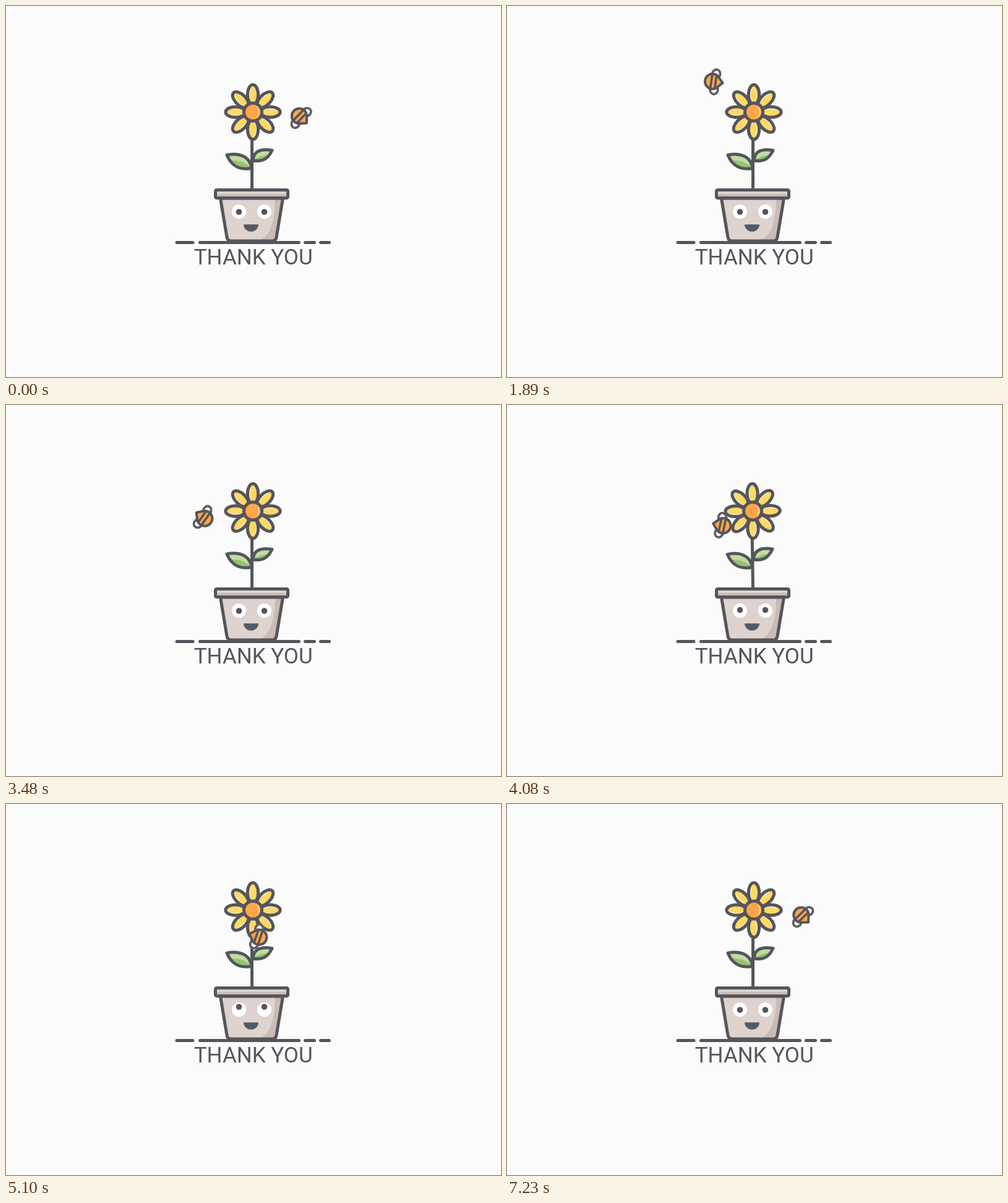
Write an HTML page that moves like this. It is 800 px wide and 600 px high and loops after 7.26 s.

```html
<!DOCTYPE html>
<html lang="en">
<head>
<meta charset="utf-8">
<title>Thank you</title>
<style>
html, body { margin: 0; height: 100%; overflow: hidden; background: #fbfbfb; }
svg { display: block; width: 800px; height: 600px; }
.line { fill: none; stroke: #55555d; stroke-width: 5; stroke-linecap: round; stroke-linejoin: round; }
text { font: 400 35px Roboto, sans-serif; fill: #55555d; text-anchor: middle; }
</style>
</head>
<body>
<svg viewBox="0 0 800 600">
  <defs>
    <g id="petal">
      <ellipse cy="-28" rx="8.6" ry="16.2" fill="#fff6dc"/>
      <ellipse cx="2" cy="-27" rx="6.8" ry="15.5" fill="#ffd966"/>
      <ellipse class="line" cy="-28" rx="8.6" ry="16.2"/>
    </g>
    <ellipse id="wing" rx="6.4" ry="7.6" fill="#fbfbfb" fill-opacity=".9" stroke="#5f5f67" stroke-width="3.8"/>
    <path id="left" d="M357 241C375 237 394 242 397 262.500C376 266 364 258 357 241Z"/>
    <path id="right" d="M430 233.500C412 230 399 235 399.500 250C416 252.500 424 246 430 233.500Z"/>
    <path id="pot" d="M346.500 311L357 374Q358 380 364 380H430Q436 380 437 374L447.500 311Z"/>
    <rect id="rim" x="338.500" y="297.500" width="117" height="13" rx="2"/>
  </defs>

  <g id="flower">
    <path class="line" d="M397.500 212V296"/>
    <g fill="#c0dca2"><use href="#left"/><use href="#right"/></g>
    <path d="M362 250Q382 248 397 262Q377 266 362 250ZM425 241Q411 241 399.500 250Q417 252 425 241Z" fill="#94c373"/>
    <g class="line"><use href="#left"/><use href="#right"/></g>
    <g transform="translate(399 171.500)">
      <g id="petals"></g>
      <circle r="14.500" fill="#ffc57c"/>
      <path d="M3-14A14.500 14.500 0 1 0 3 14Q14 0 3-14Z" fill="#ffa647"/>
      <circle class="line" r="14.500"/>
    </g>
  </g>

  <use href="#pot" fill="#ded3ce"/>
  <path d="M435 311C435 346 428 373 408 380H430Q436 380 437 374L447.500 311Z" fill="#cabcb4"/>
  <use href="#pot" class="line"/>
  <use href="#rim" fill="#ded3ce"/>
  <path d="M339 304H455V310H339Z" fill="#cabcb4"/>
  <use href="#rim" class="line"/>
  <g id="eyes"></g>
  <path d="M384 353.300H408A12 11.500 0 0 1 384 353.300Z" fill="#555a62"/>
  <path class="line" d="M276 382.400H302M313.500 382.400H473.500M483.500 382.400H498.500M508.500 382.400H522.500"/>
  <text x="399.700" y="418">THANK YOU</text>

  <g id="bee">
    <use href="#wing" transform="translate(-4 -12.500) rotate(-14)"/>
    <use href="#wing" transform="translate(-4 12.500) rotate(14)"/>
    <path d="M-16.500 0L-7.500-9.600A12.200 12.200 0 1 1-7.500 9.600Z" fill="#ffa647" stroke="#55555d" stroke-width="4" stroke-linejoin="round"/>
    <path d="M2-11V11M-5-10V10" stroke="#55555d" stroke-width="3.600"/>
  </g>
</svg>
<script>
const LOOP = 7260;
const $ = s => document.querySelector(s);
const move = (s, value) => $(s).setAttribute('transform', value);

$('#petals').innerHTML = [45, 135, 225, 315, 0, 90, 180, 270]
  .map(a => `<use href="#petal" transform="rotate(${a})"/>`).join('');
$('#eyes').innerHTML = [-20.5, 20.5].map(x =>
  `<circle cx="${x}" r="11.5" fill="#fff"/><circle class="pupil" cx="${x}" r="4.8" fill="#55555d"/>`).join('');

// The bee passes these points at equal intervals.
const route = [
  [474, 178], [424, 149], [366, 130], [315, 123], [301, 160],
  [328, 188], [364, 199], [408, 215], [456, 229], [495, 218]
];

// Closed Catmull-Rom curve; the bee faces along its tangent.
function beeAt(t) {
  const n = route.length, s = t / LOOP * n, i = Math.floor(s), u = s - i;
  const [p, q, r, w] = [n - 1, 0, 1, 2].map(d => route[(i + d) % n]);
  const [[x, dx], [y, dy]] = [0, 1].map(k => {
    const b = (r[k] - p[k]) / 2, e = (w[k] - q[k]) / 2, d = r[k] - q[k];
    const c2 = 3 * d - 2 * b - e, c3 = b + e - 2 * d;
    return [q[k] + u * (b + u * (c2 + u * c3)), b + u * (2 * c2 + 3 * u * c3)];
  });
  return `translate(${x} ${y}) rotate(${Math.atan2(dy, dx) * 180 / Math.PI})`;
}

const part = (t, from, to) => Math.min(1, Math.max(0, (t - from) / (to - from)));
const ease = (t, from, to) => { const u = part(t, from, to); return u * u * (3 - 2 * u); };
const glance = (t, from, to) => ease(t, from, from + 500) - ease(t, to, to + 350);
const blink = (t, at) => Math.sin(Math.PI * part(t, at, at + 180));

function draw() {
  const t = Math.floor(performance.now() % LOOP / 30) * 30;
  move('#bee', beeAt(t));

  const p = part(t, 3700, 4500);
  move('#flower', `rotate(${4.3 * (1 - p) ** 2 * Math.sin(p * Math.PI * 8 / 3)} 397.5 296)`);

  move('#eyes', `translate(397 332.5) scale(1 ${1 - 0.92 * (blink(t, 600) + blink(t, 6350))})`);
  const up = glance(t, 850, 1500) + glance(t, 3900, 5250);
  document.querySelectorAll('.pupil').forEach(e => e.setAttribute('cy', 0.5 - 5 * up));
  requestAnimationFrame(draw);
}
draw();
</script>
</body>
</html>
```
